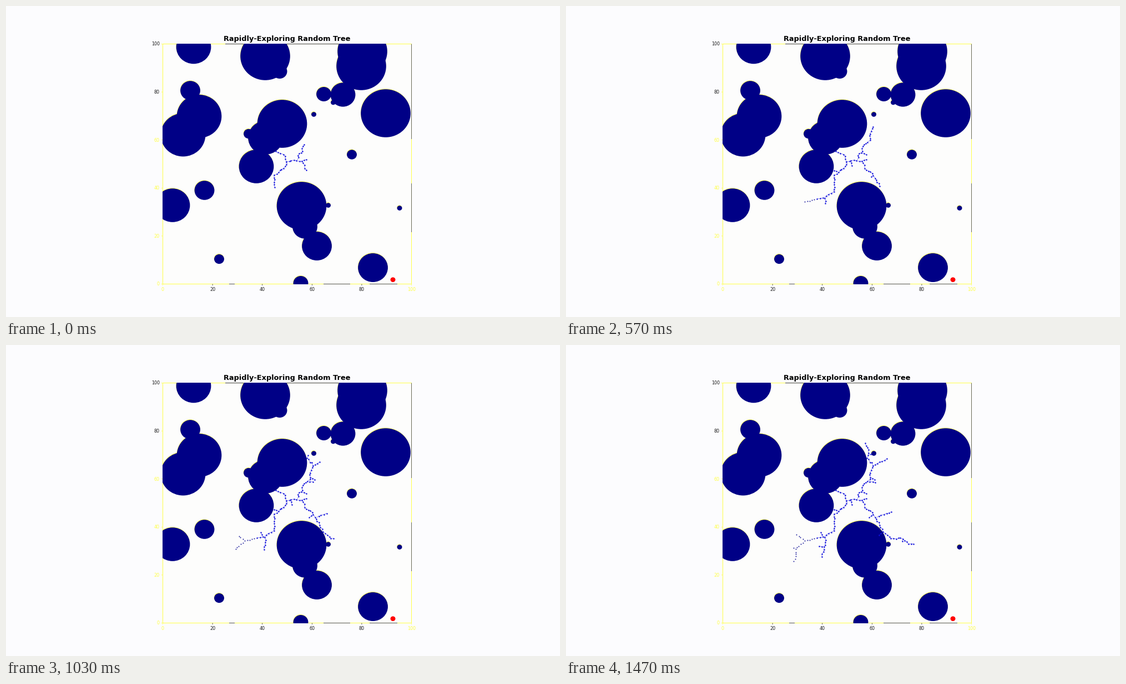
Write a matplotlib script that moves like this. It is 998 px wide and 561 px high and loops after 1510 ms.

```python
import numpy as np
import matplotlib.pyplot as plt
from matplotlib.animation import FuncAnimation
from matplotlib.patches import Ellipse, Rectangle

W, H = 998, 561
LEFT, RIGHT, TOP, BOTTOM = 282.5, 730.5, 68.5, 501.5
SX, SY = (RIGHT - LEFT) / 100, (BOTTOM - TOP) / 100
NAVY, YELLOW, DARK, BLUE = "#000086", "#ffff46", "#1c1c1c", "#1212dc"
STEP = 4.5          # pixels between tree nodes
LAST_STAGE = 44
rng = np.random.default_rng(4)

plt.rcParams["font.family"] = "DejaVu Sans"
fig = plt.figure(figsize=(W / 72, H / 72), dpi=72, facecolor="#fcfcfe")
ax = fig.add_axes([0, 0, 1, 1])
ax.set_xlim(0, W)
ax.set_ylim(H, 0)
ax.axis("off")

# Reaches half a pixel out, so that obstacles cover the frame line
box = Rectangle((LEFT - 0.5, TOP - 0.5), RIGHT - LEFT + 1, BOTTOM - TOP + 1,
                fc="#fdfdfc", ec="none")
ax.add_patch(box)


def disc(x, y, r, color, z):
    e = Ellipse((x, y), 2 * r * SX, 2 * r * SY, fc=color, ec="none", zorder=z)
    ax.add_patch(e)
    e.set_clip_path(box)


def obstacles(r, *centres):
    """Navy discs with a thin yellow rim along the top."""
    for x, y in centres:
        disc(x - 0.3, y - 0.9, r, YELLOW, 4)
        disc(x, y, r, NAVY, 5)


obstacles(10, (467, 90.5), (642, 82), (640, 108.5), (684, 193.5),
          (497.5, 212.5), (532.5, 360.5))
obstacles(9, (348, 199), (319, 232.5))
obstacles(7, (338, 74), (467.5, 237.5), (451, 289.5), (300, 359.5))
obstacles(6, (560, 433), (661, 472))
obstacles(5, (607, 160), (538.5, 398))
obstacles(4, (332, 152.5), (357.5, 332.5))
obstacles(3, (493, 118), (572.5, 159), (531, 500))
obstacles(2, (437, 230.5), (623, 268), (384, 456.5))
obstacles(1, (589.5, 174), (580.5, 359.5), (554.5, 195.5), (709, 364.5))
disc(697, 493.7, 1, "#ff0000", 5)


def rule(x0, y0, x1, y1, color=YELLOW, lw=1.0, z=2):
    ax.plot([x0, x1], [y0, y1], color=color, lw=lw, zorder=z,
            solid_capstyle="butt", snap=False)


# Frame: yellow, with some dark stretches
for x in (LEFT, RIGHT):
    rule(x, TOP, x, BOTTOM)
for y in (TOP, BOTTOM):
    rule(LEFT, y, RIGHT, y)
rule(395, TOP, 603, TOP, "#44443a", z=3)
for x0, x1 in ((402, 412), (572, 620), (655, 705)):
    rule(x0, BOTTOM, x1, BOTTOM, "#55554a", z=3)
for y0, y1 in ((TOP, 240), (320, 408)):
    rule(RIGHT, y0, RIGHT, y1, "#6a6a58", z=3)

for v in range(0, 101, 20):
    x, y = LEFT + v * SX, BOTTOM - v * SY
    x_color = DARK if 0 < v < 100 else YELLOW
    y_color = DARK if v >= 80 else YELLOW
    rule(x, BOTTOM, x, BOTTOM + 2.8, x_color, 0.7)
    rule(LEFT - 2.8, y, LEFT, y, YELLOW, 0.7)
    ax.text(x, BOTTOM + 12, str(v), size=8.05, color=x_color,
            ha="center", va="baseline")
    ax.text(LEFT - 5.6, y + 2.8, str(v), size=8.05, color=y_color,
            ha="right", va="baseline")

ax.text((LEFT + RIGHT) / 2, 63, "Rapidly-Exploring Random Tree", size=12.86,
        weight="bold", color="black", ha="center", va="baseline")

births, links = [], []


def add(birth, a, b):
    births.append(birth)
    links.append((a, b))


def limb(start, end, *points):
    """Grow a crooked limb between two stages, with a twig at its middle."""
    p = np.array(points, float)
    d = np.r_[0, np.cumsum(np.hypot(*np.diff(p, axis=0).T))]
    n = max(2, round(d[-1] / STEP))
    s = np.linspace(0, d[-1], n + 1)
    path = np.c_[np.interp(s, d, p[:, 0]), np.interp(s, d, p[:, 1])]
    path[1:-1] += rng.normal(0, 0.7, (n - 1, 2))
    for i in range(n):
        add(start + (end - start) * (i + 1) / n, path[i], path[i + 1])
    if n > 6:
        m = n // 2
        dx, dy = p[-1] - p[0]
        side = STEP * np.array([-dy, dx]) / np.hypot(dx, dy)
        born = (start + end) / 2 + rng.uniform(4, 16)
        add(born, path[m], path[m] + side)
        add(born + 4, path[m] + side, path[m] + 2 * side)


# Tree present from the first moment
limb(0, 0, (507, 285), (505, 281), (519, 278), (533, 280))
limb(0, 0, (505, 281), (499, 268), (486, 262))
limb(0, 0, (505, 281), (505, 289), (483, 306), (484, 327))
limb(0, 0, (525, 278), (526, 269), (535, 262), (533, 254), (537, 250))
limb(0, 0, (533, 280), (541, 277))
limb(0, 0, (533, 280), (541, 296))
# South-west
limb(0, 17, (484, 327), (482, 335), (466, 346), (430, 353))
limb(17, 35, (430, 353), (415, 342))
limb(17, 44, (430, 353), (414, 367), (414, 383), (410, 390))
limb(7, 44, (466, 346), (467, 356), (461, 382))
# North-east
limb(0, 17, (537, 250), (549, 241), (547, 232), (553, 218))
limb(17, 44, (553, 218), (564, 212), (578, 205))
limb(17, 44, (553, 218), (543, 203), (545, 190), (539, 177))
limb(11, 35, (549, 241), (549, 246), (557, 248))
# South-east
limb(0, 17, (541, 296), (550, 299), (565, 325))
limb(17, 28, (565, 325), (574, 340), (585, 349))
limb(28, 44, (585, 349), (604, 348), (618, 359), (626, 359))
limb(13, 40, (560, 311), (572, 305), (586, 301))

births, links = np.array(births), np.array(links)
nodes = links[:, 1]
# A gap after each link lets one line hold them all
gaps = np.pad(links, ((0, 0), (0, 1), (0, 0)), constant_values=np.nan)
loose = nodes[:, 0] < 451   # the far west shows as bare specks

edges, = ax.plot([], [], color=BLUE, lw=0.7, alpha=0.6, zorder=7)
dots, = ax.plot([], [], "o", color=BLUE, ms=2.5, mew=0, zorder=8)
specks, = ax.plot([], [], "o", color="#22229c", ms=2.0, mew=0, zorder=8)


def update(i):
    stage = min(LAST_STAGE, (3 * i + 1) // 10)
    alive = births <= stage + 1e-6
    edges.set_data(*gaps[alive & ~loose].reshape(-1, 2).T)
    dots.set_data(*nodes[alive & ~loose].T)
    specks.set_data(*nodes[alive & loose].T)
    return edges, dots, specks


anim = FuncAnimation(fig, update, frames=151, interval=10, repeat=True,
                     repeat_delay=0, blit=True)
plt.show()
```
